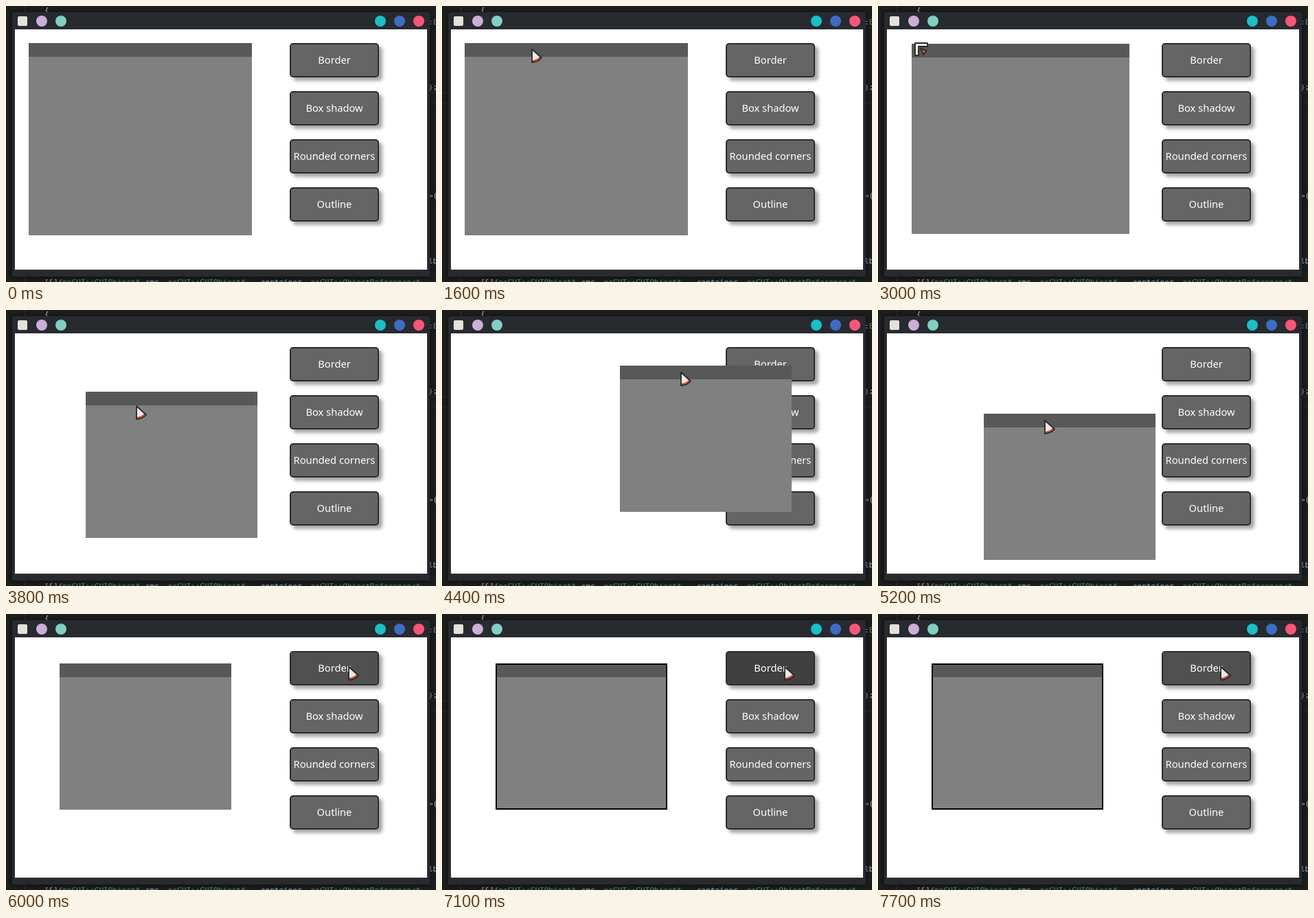
An HTML page for the animation above (8000 ms loop, 626 px wide and 402 px high).

```html
<!DOCTYPE html>
<html lang="en">
<head>
<meta charset="utf-8">
<title>Widget styling demo</title>
<style>
html, body { margin: 0; width: 100%; height: 100%; overflow: hidden; background: #1e1e1e; }
#stage { display: block; width: 626px; height: 402px; }
.code { font: 11px "DejaVu Sans Mono", monospace; fill: #b8b8b8; white-space: pre; }
.code .type { fill: #3f9c88; }
.code .var { fill: #8fc4de; }
.window { filter: drop-shadow(0 1px 4px rgba(0, 0, 0, .6)); }
.button rect { fill: #656565; stroke: #2c2c2c; stroke-width: 2; filter: drop-shadow(5px 5px 2.5px rgba(0, 0, 0, .35)); }
.button text { font: 14.7px "Noto Sans", "Open Sans", sans-serif; fill: #fff; text-anchor: middle; }
.cursor { stroke: #282828; stroke-width: 1.8; stroke-linejoin: round; }
</style>
</head>
<body>
<svg id="stage" viewBox="0 0 626 402">
  <rect width="626" height="402" fill="#1e1e1e"/>
  <path d="M0 126.5H626M0 141.5H626" stroke="#2a2a2a"/>
  <path d="M27.5 0V402" stroke="#333"/>
  <g class="code">
    <text x="56" y="10">{</text>
    <text x="615" y="27">:<tspan class="type">E</tspan></text>
    <text x="615" y="122">);</text>
    <text x="615" y="280">&gt;(</text>
    <text x="615" y="375" class="var">lb</text>
    <text x="56" y="406">[&amp;](<tspan class="type">psGUI::GUIObject*</tspan></text>
    <text x="203" y="406" class="var">sms,</text>
    <text x="236" y="406" class="type">psGUI::GUIObject*</text>
    <text x="371" y="406" class="var">container,</text>
    <text x="444" y="406" class="type">psGUI::ObjectReference&lt;*</text>
  </g>
  <path class="window" d="M9 394V13q0-4 4-4H613q4 0 4 4V394Z" fill="#272a2f"/>
  <rect x="17" y="15" width="14" height="14" rx="2" fill="#e6e1da"/>
  <circle cx="52" cy="22" r="8" fill="#cdaed6"/>
  <circle cx="80" cy="22" r="8" fill="#80d0c4"/>
  <circle cx="545" cy="22" r="8" fill="#18c0c8"/>
  <circle cx="573" cy="22" r="8" fill="#3d6cc9"/>
  <circle cx="601" cy="22" r="8" fill="#ff5577"/>
  <svg x="13" y="34" width="600" height="350" viewBox="13 34 600 350">
    <rect x="13" y="34" width="600" height="350" fill="#fff"/>
    <g id="buttons"></g>
    <g id="panel">
      <rect id="body" fill="#808080"/>
      <rect id="bar" height="20" fill="#585858"/>
      <rect id="border" x="1" y="1" fill="none" stroke="#000" stroke-width="2"/>
    </g>
  </svg>
  <g id="arrow" class="cursor">
    <path d="M1 1L15 13.5Q10 19.5 1 20Z" fill="#e9e9e9" stroke="none"/>
    <path d="M1 17Q8 16.5 12.5 11.5L15 13.5Q10 19.5 1 20Z" fill="#dc4a37" stroke="none"/>
    <path d="M1 1L15 13.5Q10 19.5 1 20Z" fill="none"/>
  </g>
  <g id="corner" class="cursor">
    <path d="M1 1H19V6H6V19H1Z" fill="#f0f0f0"/>
    <path d="M9 9L18 12L13 18Z" fill="#dc4a37"/>
  </g>
</svg>
<script>
const LOOP = 8000, STEP = 100;
const $ = id => document.getElementById(id);
const set = (el, attrs) => { for (const k in attrs) el.setAttribute(k, attrs[k]); };

$("buttons").innerHTML = ["Border", "Box shadow", "Rounded corners", "Outline"].map((label, i) =>
  `<g class="button" transform="translate(413 ${54 + 70 * i})">
    <rect x="1" y="1" width="128" height="48" rx="4"/><text x="65" y="30">${label}</text></g>`).join("");
const borderButton = document.querySelector(".button rect");

// Keys are [time, x, y]
const panelKeys = [
  [1800, 33, 54], [1900, 46, 53], [2000, 56, 53], [2100, 48, 52], [2200, 41, 52],
  [2900, 41, 52], [3000, 49, 55], [3500, 116, 119],
  [3900, 116, 119], [4100, 160, 108], [4500, 292, 72], [4700, 320, 62],
  [4800, 355, 118], [4900, 333, 179], [5000, 272, 205], [5100, 200, 190],
  [5300, 108, 112], [5500, 78, 72]
];
const cursorKeys = [
  [1000, 120, 28], [1100, 116, 53], [1200, 116, 53], [1600, 130, 62],
  [2300, 138, 60], [2400, 120, 63], [2500, 72, 60], [2600, 38, 50], [2700, 45, 50],
  [3500, 120, 117], [3600, 138, 122], [3800, 189, 139], [3900, 204, 128],
  [5500, 166, 81], [5600, 180, 81], [5700, 235, 81], [5800, 360, 80], [5900, 470, 77], [6000, 498, 76]
];
// While held, the cursor keeps its offset to the panel: [start, end, dx, dy]
const drags = [[1600, 2300, 97, 8], [2700, 3500, 4, -2], [3900, 5500, 88, 9]];
const presses = [6200, 7100, 7600];

function at(keys, t) {
  const i = keys.findIndex(k => k[0] > t);
  if (i <= 0) return keys[i ? keys.length - 1 : 0].slice(1);
  const [t0, x0, y0] = keys[i - 1], [t1, x1, y1] = keys[i];
  const f = (t - t0) / (t1 - t0);
  return [Math.round(x0 + (x1 - x0) * f), Math.round(y0 + (y1 - y0) * f)];
}

function draw(now) {
  const t = Math.floor(now % LOOP / STEP) * STEP;
  const [x, y] = at(panelKeys, t);
  const drag = drags.find(d => t >= d[0] && t <= d[1]);
  const [cx, cy] = drag ? [x + drag[2], y + drag[3]] : at(cursorKeys, t);

  // The far corner stays put while resizing
  const [w, h] = t < 2700 ? [325, 280] : t < 3500 ? [366 - x, 332 - y] : [250, 213];
  set($("panel"), { transform: `translate(${x} ${y})` });
  set($("body"), { width: w, height: h });
  set($("bar"), { width: w });
  const clicks = presses.filter(p => t >= p + STEP).length;
  set($("border"), { width: w - 2, height: h - 2, visibility: clicks % 2 ? "visible" : "hidden" });

  const resizing = t >= 2700 && t <= 3500;
  const place = `translate(${cx} ${cy})`;
  set($("arrow"), { transform: place, visibility: t >= 1000 && !resizing ? "visible" : "hidden" });
  set($("corner"), { transform: place, visibility: resizing ? "visible" : "hidden" });

  const hover = !drag && cx >= 413 && cx < 543 && cy >= 54 && cy < 104;
  borderButton.style.fill = presses.includes(t) ? "#404040" : hover ? "#505050" : "#656565";
}

const start = performance.now();
function tick() {
  draw(performance.now() - start);
  requestAnimationFrame(tick);
}
tick();
</script>
</body>
</html>
```
